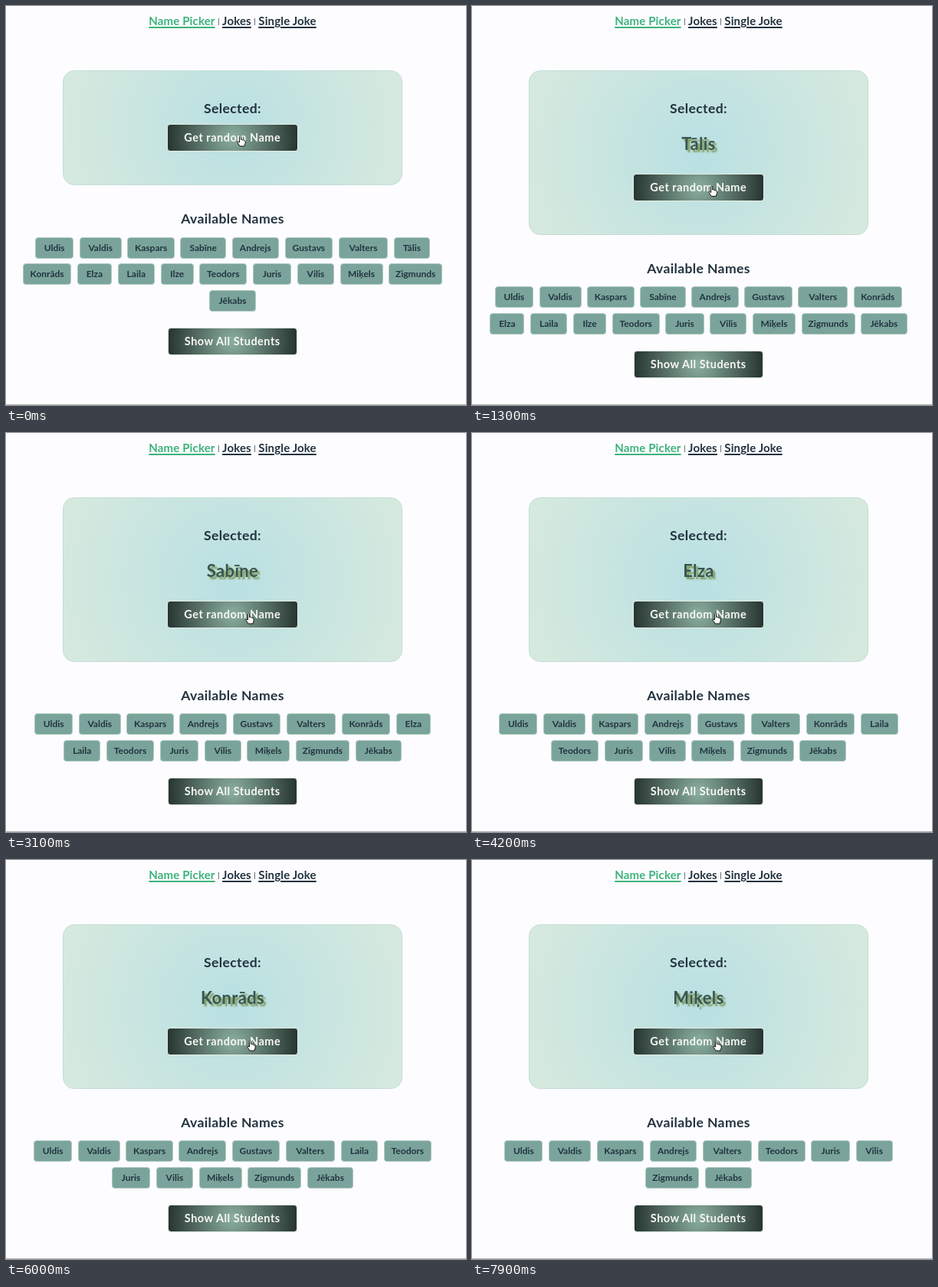
Animation of 600x521 px, one loop 8 s. Source, as an HTML page:

```html
<!DOCTYPE html>
<html lang="en">
<head>
<meta charset="utf-8">
<title>Name Picker</title>
<style>
  html, body { margin: 0; width: 100%; height: 100%; overflow: hidden; background: #fdfcfe; }
  #stage {
    position: relative; width: 600px; height: 521px; overflow: hidden;
    font: 700 17.6px/24px Lato, "Open Sans", sans-serif; letter-spacing: .35px; color: #22333f;
  }
  #stage > * { position: absolute; box-sizing: border-box; }
  nav {
    left: 0; width: 591px; top: 7px; display: flex; justify-content: center; gap: 3.4px;
    font-size: 15px; letter-spacing: .15px;
  }
  nav a { text-decoration: underline; text-decoration-thickness: 1.5px; text-underline-offset: 2px; }
  nav a:first-child { color: #3bb37c; }
  nav i { font: 10px/24px Lato, sans-serif; }
  .line { left: 0; width: 591px; text-align: center; }
  #panel {
    left: 74px; top: 84px; width: 443px; border: 1px solid #c5ddd5; border-radius: 15px;
    background: radial-gradient(circle, #b9e0e3, #d5e9de 92%);
  }
  #picked {
    top: 165.5px; font-size: 22px; line-height: 27px; color: #3a564f;
    text-shadow: 3px 3px 2px #7e9a5c;
  }
  .button {
    height: 36px; border: 1px solid #e4ebe2; border-radius: 4px; text-align: center;
    font-size: 14.5px; line-height: 33px; letter-spacing: .5px; color: #f8f8f2;
    background: radial-gradient(circle, #8bb0a0, #263330);
  }
  .button.idle { border-color: #e9f4f2; background: radial-gradient(circle, #5ba387, #b9d9d9); }
  #get { left: 210px; width: 170.5px; }
  #show { left: 211px; width: 168.5px; }
  #chips {
    left: 15.5px; width: 560px; display: flex; flex-wrap: wrap; justify-content: center;
    gap: 6.5px 7.6px; font-size: 12px; letter-spacing: 0;
  }
  #chips span {
    box-sizing: border-box; height: 28px; line-height: 26px; text-align: center;
    border: 1px solid #b0cac2; border-radius: 4px; background: #7aa49b;
  }
  #floor { left: 0; top: 520px; width: 600px; height: 1px; background: #aeaeb0; }
  #cursor { left: 0; top: 0; width: 16px; height: 18px; overflow: visible; }
</style>
</head>
<body>
<div id="stage">
  <nav><a>Name Picker</a><i>|</i><a>Jokes</a><i>|</i><a>Single Joke</a></nav>
  <div id="panel"></div>
  <div class="line" style="top:122px">Selected:</div>
  <div class="line" id="picked"></div>
  <div class="button" id="get">Get random Name</div>
  <div class="line" id="heading">Available Names</div>
  <div id="chips"></div>
  <div class="button" id="show">Show All Students</div>
  <div id="floor"></div>
  <svg id="cursor">
    <path id="hand" fill="#fff" stroke="#111" stroke-width="1" stroke-linejoin="round"
      d="M-2.5 1V-5.5Q-1.5-7.5-.5-5.5V-1.5Q1-2.5 1.7-1 3-1.7 3.6-.3 5-.6 5.2 1V3L4 7H-2L-5.3 2Q-5 0-2.5 2Z"/>
    <g id="beam" fill="none">
      <path stroke="#fff" stroke-width="2.5" d="M0-4V4"/>
      <path stroke="#222" d="M-2.5-5.5Q0-5.5 0-4V4Q0 5.5-2.5 5.5M2.5-5.5Q0-5.5 0-4V4Q0 5.5 2.5 5.5"/>
    </g>
  </svg>
</div>
<script>
const LOOP = 8000, STEP = 100, ROW = 34.5, RESULT_HEIGHT = 64.5;

// name: chip width
const students = {
  Uldis: 50, Valdis: 55, Kaspars: 61.5, Sabīne: 59.5, Andrejs: 61.5, Gustavs: 62.5,
  Valters: 64.5, Tālis: 47, Konrāds: 63.5, Elza: 45, Laila: 48.5, Ilze: 43,
  Teodors: 62, Juris: 50.5, Vilis: 48, Miķels: 56, Zigmunds: 70, Jēkabs: 60.5
};

const picks = [
  [600, "Tālis"], [2000, "Ilze"], [3000, "Sabīne"], [4200, "Elza"],
  [5200, "Konrāds"], [6100, "Laila"], [6900, "Gustavs"], [7700, "Miķels"]
];

// time, x, y
const cursorPath = [
  [0, 307, 176], [500, 307, 176], [600, 305, 170], [800, 305, 172], [1400, 315, 247],
  [2100, 316, 248], [3000, 318, 242], [5200, 320, 242], [LOOP, 320, 242]
];

const el = id => document.getElementById(id);
const setTop = (id, y) => { el(id).style.top = y + "px"; };
const toggle = (node, visible) => { node.style.display = visible ? "" : "none"; };

const chips = Object.entries(students).map(([name, width]) => {
  const chip = document.createElement("span");
  chip.textContent = name;
  chip.style.width = width + "px";
  return el("chips").appendChild(chip);
});

function cursorAt(time) {
  const next = Math.max(1, cursorPath.findIndex(point => point[0] > time));
  const [t0, x0, y0] = cursorPath[next - 1];
  const [t1, x1, y1] = cursorPath[next];
  const k = (time - t0) / (t1 - t0);
  const eased = k * k * (3 - 2 * k);
  return [x0 + (x1 - x0) * eased, y0 + (y1 - y0) * eased];
}

function render(time) {
  const taken = picks.filter(pick => pick[0] <= time).map(pick => pick[1]);
  const shift = taken.length ? RESULT_HEIGHT : 0;
  const buttonTop = 154 + shift;
  const [x, y] = cursorAt(time);
  const hovered = y > buttonTop && y < buttonTop + 36;

  el("picked").textContent = taken[taken.length - 1] || "";
  chips.forEach(chip => toggle(chip, !taken.includes(chip.textContent)));
  el("panel").style.height = 150 + shift + "px";
  setTop("get", buttonTop);
  setTop("heading", 266 + shift);
  setTop("chips", 301.5 + shift);
  setTop("show", 419.8 + shift - (taken.length ? ROW : 0));

  el("get").classList.toggle("idle", !hovered);
  el("cursor").style.transform = `translate(${x}px, ${y}px)`;
  toggle(el("hand"), hovered);
  toggle(el("beam"), !hovered);
}

const start = performance.now();
function frame() {
  const time = (performance.now() - start) % LOOP;
  render(Math.floor(time / STEP) * STEP);
  requestAnimationFrame(frame);
}
frame();
</script>
</body>
</html>
```
